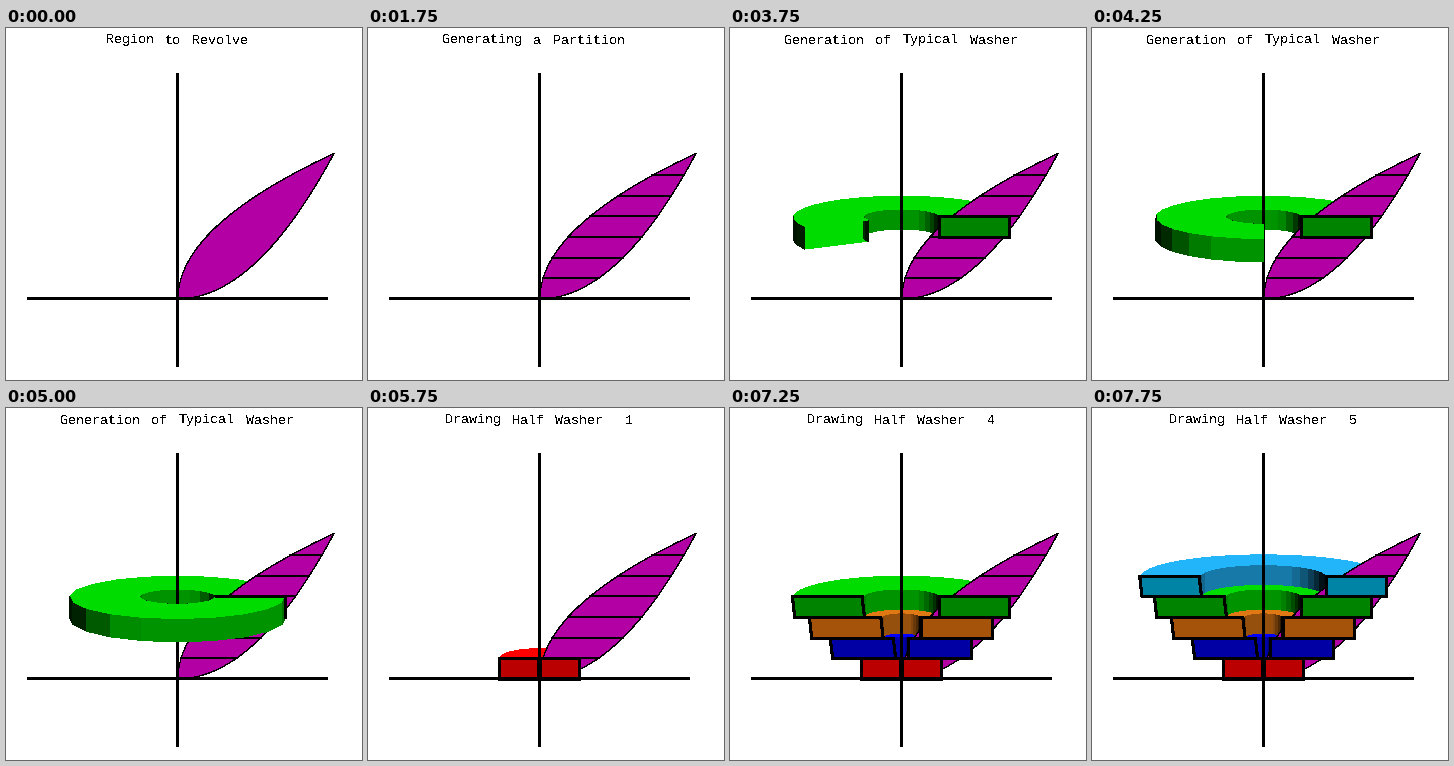
These frames come from a looping animation (356x352 px, 8 s). A matplotlib script:

```python
import math

import matplotlib.pyplot as plt
import numpy as np
from matplotlib.animation import FuncAnimation
from matplotlib.colors import to_rgb
from matplotlib.patches import Polygon

plt.rcParams["text.antialiased"] = False

W, H = 356, 352
FRAMES, STEP_MS = 32, 250
CX, BASE = 171.5, 270.7         # where the two axes cross
SPAN, RISE, SLICE = 156, 145.3, 20.55
PX = 0.72                       # points per pixel at 100 dpi
LIGHT = math.radians(292)
SEGMENTS = 20

PURPLE = "#b200a5"
# flat rectangle colour and lit top colour of each washer
COLORS = [
    ("#ba0000", "#ff0000"),
    ("#0000a5", "#0000ff"),
    ("#a5520a", "#e07814"),
    ("#008400", "#00dc00"),
    ("#0084a5", "#22b5fa"),
]

fig = plt.figure(figsize=(W / 100, H / 100), dpi=100, facecolor="white")
ax = fig.add_axes([0, 0, 1, 1])


def left_curve(u):
    return SPAN * (u / RISE) ** 2


def right_curve(u):
    return SPAN * np.sqrt(u / RISE)


def level(k):
    return round(BASE - SLICE * k)


def pen(pixels):
    # unsmoothed strokes fill every pixel they touch, so draw them thinner
    return (pixels - 0.9) * PX


def poly(points, fill, outline=0):
    ax.add_patch(Polygon(points, closed=True, facecolor=fill,
                         edgecolor="black" if outline else "none",
                         linewidth=pen(outline) if outline else 0,
                         antialiased=False, snap=False, zorder=1))


def line(x0, y0, x1, y1, width):
    ax.plot([x0, x1], [y0, y1], color="black", linewidth=pen(width),
            solid_capstyle="projecting", antialiased=False, snap=False,
            zorder=1)


def title(text):
    """Centred monospaced words with slightly wide spaces."""
    char, gap = 8.0, 11.2
    words = text.split(" ")
    x = 171 - (char * sum(map(len, words)) + gap * (len(words) - 1)) / 2
    for word in words:
        ax.text(x, 15.5, word, family="Liberation Mono", fontsize=13.33 * PX,
                va="baseline", ha="left", color="black")
        x += char * len(word) + gap


def radii(n):
    u = SLICE * (n - 0.5)
    return left_curve(u), right_curve(u) - 1.8


def project(r, angle, u):
    depth = r * math.sin(angle)
    scale = 1 / (1 + 0.0006 * depth)
    tilt = 0.26 - 0.00073 * u
    return CX + r * math.cos(angle) * scale, BASE - u - tilt * depth * scale


def shade(color, normal):
    k = min(0.67, 0.08 + 0.85 * max(0, math.cos(normal - LIGHT)))
    return tuple(k * c for c in to_rgb(color))


def washer(n, sweep, front):
    """Half of a hollow ring swept from 0: behind or before the axis plane."""
    r0, r1 = radii(n)
    low, high = SLICE * (n - 1), SLICE * n
    top = COLORS[n - 1][1]
    edges = np.radians(np.linspace(0, sweep, SEGMENTS + 1))
    parts = []
    for a, b in zip(edges, edges[1:]):
        mid = (a + b) / 2
        if (math.sin(mid) < 0) == front:
            parts.append((a, b, mid))

    def flat(u):
        for a, b, _ in parts:
            poly([project(r0, a, u), project(r1, a, u),
                  project(r1, b, u), project(r0, b, u)], top)

    def wall(r, turn):
        for a, b, mid in parts:
            poly([project(r, a, low), project(r, a, high),
                  project(r, b, high), project(r, b, low)],
                 shade(top, mid + turn))

    flat(low)
    wall(r0, math.pi)
    flat(high)
    if front:
        wall(r1, 0)


def section(n, side):
    """Outlined cross-section, side 1 for right and -1 for left."""
    r0, r1 = radii(n)
    lean = 1.2 if side < 0 and n > 1 else 0
    y0, y1 = level(n) + 0.5, level(n - 1) + 0.5
    xa, xb = CX + side * r0, CX + side * r1
    poly([(xa - lean, y0), (xb - lean, y0), (xb + lean, y1), (xa + lean, y1)],
         COLORS[n - 1][0], 3)


def seam(n):
    """Top and outer edge of the right section, left visible by the ring."""
    r0, r1 = radii(n)
    y0, y1 = level(n) + 0.5, level(n - 1) + 0.5
    line(CX + r0, y0, CX + r1, y0, 2)
    line(CX + r1, y0, CX + r1, y1, 2)


def region(cuts):
    u = np.linspace(0, 1, 60) ** 2 * RISE
    xs = np.concatenate([left_curve(u), right_curve(u)[::-1]]) + CX + 0.5
    ys = BASE - np.concatenate([u, u[::-1]])
    poly(np.column_stack([xs, ys]), PURPLE, 1)
    for k in range(1, cuts + 1):
        u = min(SLICE * k, RISE) if k < 7 else RISE
        y = round(BASE - u)
        line(CX + 0.5 + left_curve(u), y, CX + 0.5 + right_curve(u), y, 2)


def axes():
    line(22.5, BASE, 320.5, BASE, 3)
    line(CX, 46.5, CX, 337.5, 3)


def partition(i):
    title("Generating a Partition " if i else "Region to Revolve")
    region(min(i, 7))
    axes()


def typical(i):
    sweep = min(360, 30 + 30 * i) if i else 0
    title("Generation of Typical Washer" if i
          else "Rectangle to Determine Washer")
    if sweep:
        washer(4, sweep, front=False)
    region(7)
    axes()
    section(4, 1)
    if sweep > 180:
        washer(4, sweep, front=True)
        seam(4)


def stack(i):
    n, drawn = i // 2 + 1, (i + 1) // 2
    title(f"Drawing Half Washer  {n}" if i % 2
          else f"Rectangle to Determine Washer {n}")
    for k in range(1, drawn + 1):
        washer(k, 180, front=False)
    region(7)
    for k in range(1, n + 1):
        section(k, 1)
        if k <= drawn:
            section(k, -1)
    axes()


def draw(i):
    ax.clear()
    ax.set_xlim(0, W)
    ax.set_ylim(H, 0)
    ax.axis("off")
    if i < 9:
        partition(i)
    elif i < 22:
        typical(i - 9)
    else:
        stack(i - 22)
    return []


anim = FuncAnimation(fig, draw, frames=FRAMES, init_func=lambda: [],
                     interval=STEP_MS, repeat=True, repeat_delay=0)
plt.show()
```
